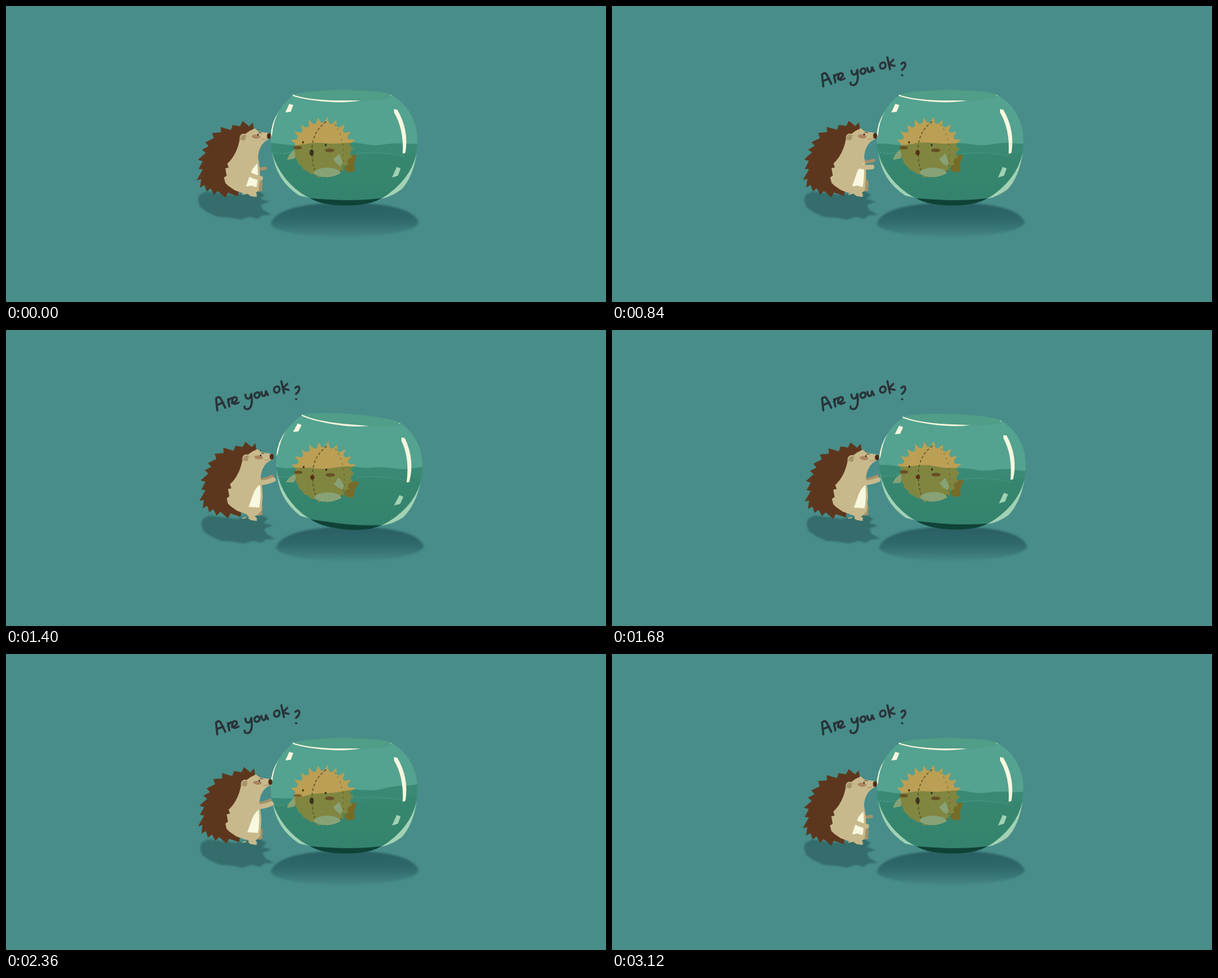
These frames come from a looping animation (900x445 px, 3160 ms). An HTML page with a canvas:

```html
<!DOCTYPE html>
<html lang="en">
<head>
<meta charset="utf-8">
<title>Are you ok?</title>
<style>
html, body { margin: 0; width: 100%; height: 100%; overflow: hidden; background: #488d89; }
canvas { display: block; }
</style>
</head>
<body>
<canvas id="stage" width="900" height="445" role="img" aria-label="Are you ok?"></canvas>
<script>
const c = document.getElementById('stage').getContext('2d');
const LOOP = 3160, STEP = 40, TAU = Math.PI * 2;
const TAN = '#c8b98c', TAN_DARK = '#a5916a', BROWN = '#5d371d', WHITE = '#f7f8df', PALE = '#a2d2b3';

// ---- helpers ----
const fill = (d, color) => { c.fillStyle = color; c.fill(new Path2D(d)); };
const stroke = (d, color, width, dash = []) => {
  c.strokeStyle = color;
  c.lineWidth = width;
  c.setLineDash(dash);
  c.stroke(new Path2D(d));
};
const oval = (x, y, rx, ry, color, turn = 0) => {
  c.fillStyle = color;
  c.beginPath();
  c.ellipse(x, y, rx, ry, turn, 0, TAU);
  c.fill();
};
const group = draw => { c.save(); draw(); c.restore(); };
const mix = (a, b, k) => a + (b - a) * k;
const turnAt = (x, y, angle) => { c.translate(x, y); c.rotate(angle); c.translate(-x, -y); };

// Eased value at time t from [time, value] pairs
function keyed(t, keys) {
  if (t <= keys[0][0]) return keys[0][1];
  for (let i = 1; i < keys.length; i++) {
    const [t0, a] = keys[i - 1], [t1, b] = keys[i];
    if (t <= t1) return mix(a, b, (1 - Math.cos(Math.PI * (t - t0) / (t1 - t0))) / 2);
  }
  return keys[keys.length - 1][1];
}

// ---- timing of the parts ----
const PUSH_START = 1210, PUSH_TIME = 380, PUSHES = 3;
const pushAt = t => {
  const u = (t - PUSH_START) / PUSH_TIME;
  return u > 0 && u < PUSHES ? Math.sin(Math.PI * u) ** 2 : 0;
};
const reachKeys = [[560, 0], [1120, 1], [2440, 1], [2840, 0]];
const sloshKeys = [[1210, 0], [1300, 5], [1400, 0], [1500, -7], [1600, 2], [1690, 5], [1790, 0],
  [1890, -7], [2000, 6], [2170, 3], [2360, -11], [2560, 5], [2760, -2], [2920, 0]];

// ---- shadows ----
function shadows(push, lean) {
  group(() => {
    c.filter = 'blur(1px)';
    c.translate(lean * 3 + push * 2, 0);
    fill('M288 292L290 284L300 279L340 284L378 278L388 284L381 290L395 294L382 299L386 307L399 314L384 315L378 320L366 317L352 321L334 318L318 317L302 310L291 302Z', '#346d6b');
  });
  group(() => {
    c.filter = 'blur(1.5px)';
    c.translate(push * 8, 0);
    const g = c.createLinearGradient(0, 297, 0, 348);
    g.addColorStop(0, '#295f63');
    g.addColorStop(0.5, '#2f696b');
    g.addColorStop(1, '#468986');
    fill('M397 327C406 302 460 296 508 296C560 296 610 302 619 325C612 354 404 354 397 327Z', g);
  });
}

// ---- hedgehog ----
const QUILLS = [[378, 185], [370, 175], [355, 173], [340, 179], [322, 182], [309, 191], [299, 205],
  [294, 216], [288, 231], [289, 245], [286, 262], [291, 273], [301, 279], [312, 284], [329, 288], [348, 286], [364, 283]];

function coat() {
  c.beginPath();
  QUILLS.forEach(([x, y], i) => {
    if (i) {
      const [px, py] = QUILLS[i - 1];
      const vx = mix(px, x, 0.15), vy = mix(py, y, 0.15), d = Math.hypot(338 - vx, 235 - vy);
      c.lineTo(vx + (338 - vx) / d * 7, vy + (235 - vy) / d * 7);
    }
    c.lineTo(x, y);
  });
  c.lineTo(370, 230);
  c.closePath();
  c.fillStyle = BROWN;
  c.fill();
}

function arm(from, to, color, width) {
  const [x, y] = from, [u, v] = to;
  stroke(`M${x} ${y}Q${mix(x, u, 0.5)} ${mix(y, v, 0.5) + 3} ${u} ${v}`, color, width);
}

function hedgehog(push, reach, lean) {
  const dx = lean * 2 + push * 2, dy = -lean * 3 - push * 2;
  const lerp = (a, b) => [mix(a[0], b[0], reach) + push * 3, mix(a[1], b[1], reach)];
  oval(380, 276, 5, 3, TAN_DARK);
  oval(380, 268, 5, 8, TAN_DARK);
  arm(lerp([370, 243], [376, 225]), lerp([389, 244], [396, 220]), TAN_DARK, 5);
  group(() => {
    c.translate(dx, dy);
    coat();
    fill('M365 188L373 184L380 189L394 191L396 199L388 204Q379 212 378 227Q381 244 381 256L379 277L372 284L357 282L343 277L333 270L329 266L327 258L331 255L329 244L334 243L332 237Q347 223 351 198Z', TAN);
    oval(356, 198, 5.5, 6, TAN, 0.3);
    stroke('M352 201Q352 193 360 195', TAN_DARK, 1.5);
    oval(356.5, 198.5, 3, 3.8, TAN_DARK, 0.4);
    oval(375, 196.5, 6.5, 3, '#aa8460', 0.1);
    oval(378, 193.5, 1.1, 1.3, '#2d211a');
    stroke('M379 190l4 1', '#4c3528', 0.9);
    oval(394.5, 195.5, 3, 4.2, '#4c2918');
    stroke('M384 201Q389 201 392 199', '#9d815b', 0.8);
    fill('M377 237Q370 243 367 251L360 271L376 272Q379 255 377 237Z', WHITE);
  });
  oval(368, 276, 7, 6, TAN, 0.3);
  oval(370, 283, 6.5, 3.2, TAN, 0.1);
  stroke('M372 286h4M355 283l5 -1', TAN, 1.5);
  arm(lerp([359, 249], [372, 230]), lerp([382, 259], [398, 225]), TAN, 7);
}

// ---- fish ----
const DRY = { skin: '#bb9f54', edge: '#c1a55c', patch: '#c8b780', tail: '#98782c', seam: '#4e4523', cheek: '#80632f' };
const WET = { skin: '#80853f', edge: '#8a8f4b', patch: '#87a276', tail: '#776b28', seam: '#484c24', cheek: '#684f25' };

function fish(p, flap, mouth) {
  const cx = 475, cy = 215;
  group(() => {
    turnAt(511, 237, mix(0.55, 0, flap));
    fill('M508 246L511 229L519 224L526 224L522 237L523 248L514 250Z', p.tail);
  });
  group(() => {
    turnAt(434, 219, mix(0.65, 0, flap));
    fill('M435 218L431 217L425 224L422 231L433 229Z', p.patch);
  });
  c.beginPath();
  const n = 22;
  for (let i = 0; i < n; i++) {
    const at = (k, r) => {
      const a = (i + k) / n * TAU;
      c.lineTo(cx + Math.cos(a) * (r + 2), cy + Math.sin(a) * r);
    };
    const a = i / n * TAU, up = -Math.sin(a), left = -Math.cos(a);
    const tip = up > 0.2 ? 8 + i % 2 : left > 0.3 ? 1 : 4;
    at(-0.5, 39.5);
    at(-0.3, 40);
    at(0, 40 + tip);
    at(0.3, 40);
  }
  c.closePath();
  c.fillStyle = p.skin;
  c.fill();
  for (let i = 0; i < 60; i++) {
    const a = i * 2.4, r = 38 * Math.sqrt(i / 60);
    stroke(`M${cx + Math.cos(a) * r} ${cy + Math.sin(a) * r}l1 2`, p.edge, 0.8);
  }
  stroke('M480 174Q459 190 459 216Q459 234 463 246', p.seam, 1.2, [3, 4]);
  stroke('M493 178Q509 200 506 236L502 252', p.seam, 0.7, [2, 6]);
  fill('M461 251Q466 243 482 243Q498 243 502 251Q492 257 480 257Q468 257 461 251Z', p.patch);
  group(() => {
    turnAt(493, 230, mix(-0.5, 0, flap));
    fill('M491 230L500 222L505 235L502 241L495 236Z', p.patch);
  });
  oval(437.5, 213, 6.5, 2.6, p.cheek);
  oval(485.5, 217, 7, 2.8, p.cheek);
  oval(445.5, 205, 1.2, 1.7, '#231f18');
  oval(479.5, 209, 1.3, 1.7, '#231f18');
  oval(458.5, 220.5, 3.1, mouth, mouth > 4.2 ? '#3b3020' : '#582d19');
}

// ---- bowl ----
const BOWL = 'M431 134C409 150 397 176 397 201C397 240 420 270 457 289Q510 310 562 289C597 272 617 240 617 202C617 172 603 149 579 134Q505 119 431 134Z';
const tilt = push => turnAt(511, 297, push * 0.082);

function waterPath(t, slosh, depth) {
  let d = 'M380 320';
  for (let x = 380; x <= 640; x += 4) {
    const far = (x - 507) / 110, phase = t / LOOP * TAU * 4;
    const y = 207 + depth + slosh * far + Math.sin(x / 9.5 - phase + depth) * 1.1 + Math.sin(x / 21 + phase) * 1.2;
    d += `L${x} ${y}`;
  }
  return d + 'L640 320Z';
}

function bowl(t, push) {
  const slosh = keyed(t, sloshKeys), phase = t / 790;
  const flap = (1 + Math.cos(phase * TAU)) / 2;
  const gape = (1 + Math.cos((phase - 0.93) * TAU)) / 2;
  const mouth = 2.3 + 2.8 * gape ** 3;
  const surface = waterPath(t, slosh, 0);

  group(() => {
    tilt(push);
    fill(BOWL, '#54a290');
    oval(505, 135, 74, 8.5, '#509d88');
  });
  group(() => {
    tilt(push);
    c.clip(new Path2D(BOWL));
    c.setTransform(1, 0, 0, 1, 0, 0);
    fill(surface, '#398a74');
    const g = c.createLinearGradient(0, 216, 0, 292);
    g.addColorStop(0, '#378770');
    g.addColorStop(1, '#34836d');
    fill(waterPath(t, slosh * 0.6, 15), g);
    const ripple = slosh / 2;
    stroke(`M402 ${220 - ripple}q10 4 28 -1M526 ${222 + ripple}q30 -4 72 4`, '#57a18c', 0.9, [2, 3]);
  });
  group(() => {
    c.translate(push, push);
    fish(DRY, flap, mouth);
  });
  group(() => {
    c.clip(new Path2D(surface));
    c.translate(push, push);
    fish(WET, flap, mouth);
  });
  group(() => {
    tilt(push);
    fill('M456 289Q480 291 510 292Q540 292 563 289Q545 300 510 300Q475 300 456 289Z', '#0f4237');
    fill('M409 159Q397 176 397 199L399 194Q401 173 409 159Z', WHITE);
    fill('M399 218Q407 263 453 288L440 285Q404 262 399 218Z', PALE);
    fill('M400 222Q411 262 452 288Q412 272 400 222Z', PALE);
    fill('M616 221Q607 262 563 290Q580 286 594 275Q611 256 616 221Z', PALE);
    fill('M430 133Q450 141 495 142L532 142Q510 146 482 144Q445 141 430 135Z', WHITE);
    fill('M582 155L587 156Q605 187 599 221L595 222Q597 185 582 160Z', WHITE);
    fill('M425 147L431 149L427 159L419 160Z', WHITE);
    fill('M586 242L592 244L588 255L579 258Z', PALE);
    oval(577, 134.5, 1.2, 0.8, PALE);
  });
}

// ---- hand lettering ----
const LETTERING = 'M317 121L315 103Q320 98 323 105L329 117M316 113L326 109' +
  'M333 104L335 115M333 108Q336 101 340 103M339 110Q348 107 346 102Q341 98 339 107Q341 114 349 109' +
  'M359 97Q360 106 366 102L368 96Q371 118 362 119Q357 119 358 115' +
  'M376 94C371 95 372 103 377 102C382 101 381 92 376 94' +
  'M383 93Q384 102 389 98L390 92L393 98' +
  'M406 85C400 86 401 96 407 94C412 93 411 83 406 85' +
  'M413 77L417 95M422 81L415 88L424 90' +
  'M434 87Q439 82 440 88Q440 92 435 96M435 104l.5 0';

function frame(t) {
  const push = pushAt(t), reach = keyed(t, reachKeys), lean = reach ** 3;
  c.fillStyle = '#488d89';
  c.fillRect(0, 0, 900, 445);
  c.lineCap = c.lineJoin = 'round';
  shadows(push, lean);
  bowl(t, push);
  hedgehog(push, reach, lean);
  if (t >= 640) stroke(LETTERING, '#293239', 3.1);
}

function tick(now) {
  frame(Math.floor(now % LOOP / STEP) * STEP);
  requestAnimationFrame(tick);
}
requestAnimationFrame(tick);
</script>
</body>
</html>
```
